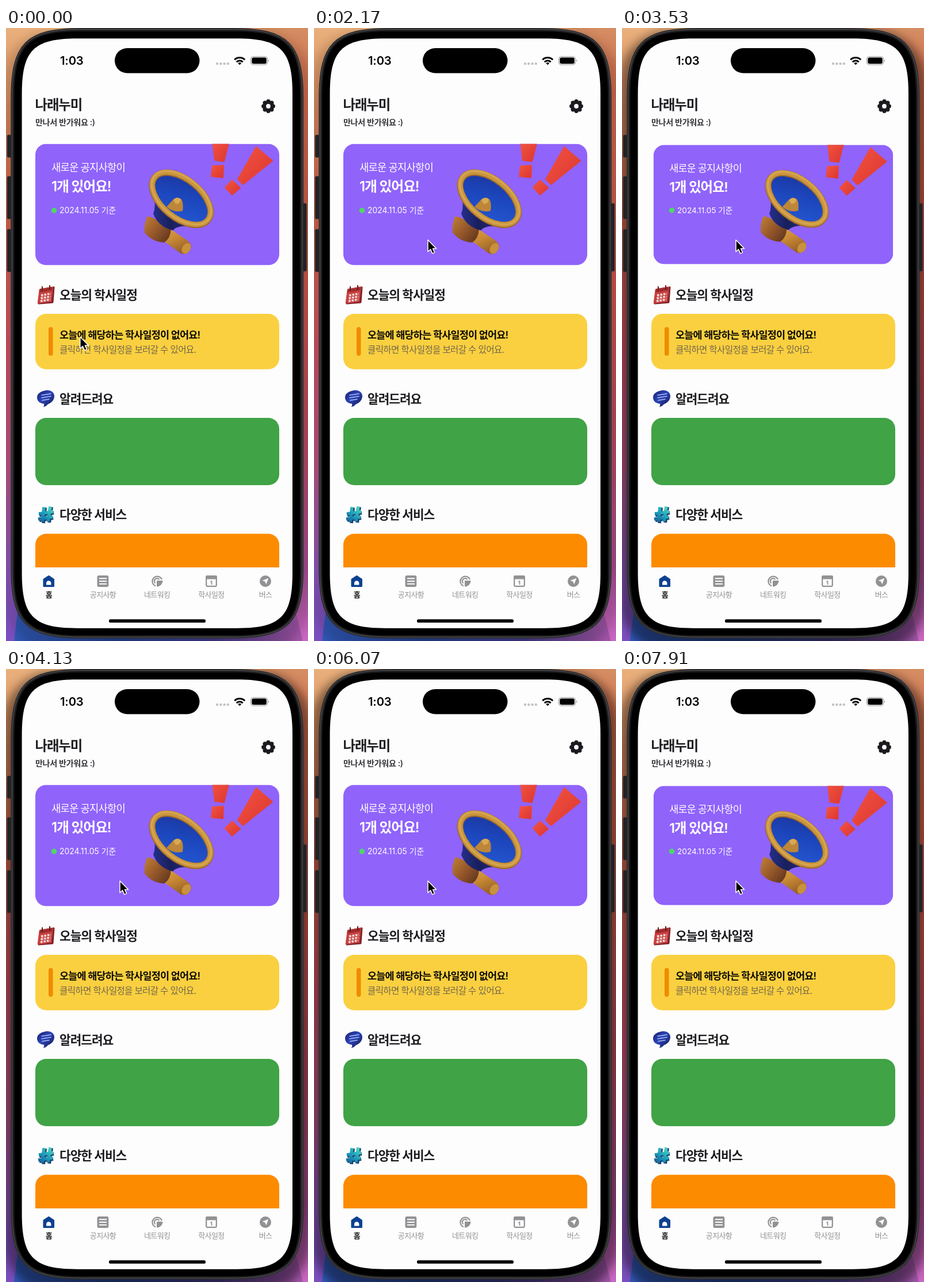
Animation of 525x1066 px, one loop 8000 ms. Source, as an HTML page:

```html
<!DOCTYPE html>
<html lang="ko">
<head>
<meta charset="utf-8">
<title>Card press</title>
<style>
html, body { margin: 0; width: 100%; height: 100%; overflow: hidden; background: #1c1c1e; }
svg { display: block; width: 525px; height: 1066px; }
text { font-family: Inter, "Noto Sans CJK KR", "Noto Sans CJK", sans-serif; white-space: pre; }
</style>
</head>
<body>
<svg viewBox="0 0 525 1066" xmlns="http://www.w3.org/2000/svg">
  <defs>
    <linearGradient id="leftWall" x2="0" y2="1">
      <stop offset="0" stop-color="#e9b07c"/><stop offset=".13" stop-color="#d8895c"/>
      <stop offset=".3" stop-color="#d5654c"/><stop offset=".52" stop-color="#cf5363"/>
      <stop offset=".72" stop-color="#ba5488"/><stop offset=".88" stop-color="#8e58bd"/>
      <stop offset="1" stop-color="#7a4fc0"/>
    </linearGradient>
    <linearGradient id="rightWall" x2="0" y2="1">
      <stop offset="0" stop-color="#d58e63"/><stop offset=".1" stop-color="#cf6a4c"/>
      <stop offset=".4" stop-color="#cc5647"/><stop offset=".65" stop-color="#b94a5c"/>
      <stop offset=".88" stop-color="#a94c92"/><stop offset="1" stop-color="#c968c4"/>
    </linearGradient>
    <linearGradient id="floor">
      <stop offset="0" stop-color="#3159b8"/><stop offset=".35" stop-color="#23408c"/>
      <stop offset=".7" stop-color="#433a86"/><stop offset="1" stop-color="#a556a8"/>
    </linearGradient>
    <linearGradient id="red" x2="1" y2="1">
      <stop offset="0" stop-color="#f2543f"/><stop offset="1" stop-color="#dc3632"/>
    </linearGradient>
    <linearGradient id="gold" x2=".5" y2="1">
      <stop offset="0" stop-color="#dda344"/><stop offset=".5" stop-color="#c88a35"/><stop offset="1" stop-color="#9a6128"/>
    </linearGradient>
    <linearGradient id="brown" x2="1" y2=".8">
      <stop offset="0" stop-color="#c28135"/><stop offset=".5" stop-color="#995a2b"/><stop offset="1" stop-color="#63371f"/>
    </linearGradient>
    <linearGradient id="bell" x2=".8" y2="1">
      <stop offset="0" stop-color="#1b3295"/><stop offset=".5" stop-color="#1c46bc"/><stop offset="1" stop-color="#2458d2"/>
    </linearGradient>
    <linearGradient id="cone">
      <stop offset="0" stop-color="#26328f"/><stop offset=".45" stop-color="#191f5c"/><stop offset="1" stop-color="#2a2d7d"/>
    </linearGradient>
    <linearGradient id="bubble" x2="1" y2="1">
      <stop offset="0" stop-color="#191c6a"/><stop offset=".45" stop-color="#2c46b8"/><stop offset="1" stop-color="#12124a"/>
    </linearGradient>
    <linearGradient id="teal" gradientUnits="userSpaceOnUse" x1="80" y1="834" x2="58" y2="860">
      <stop offset="0" stop-color="#4fd6c0"/><stop offset=".5" stop-color="#1b9dba"/><stop offset="1" stop-color="#1c5c9a"/>
    </linearGradient>
    <clipPath id="cardClip"><rect x="51" y="201.500" width="424" height="211" rx="19"/></clipPath>
    <clipPath id="listClip"><rect x="27" y="870" width="471" height="68"/></clipPath>
    <filter id="soft" x="-20%" y="-10%" width="140%" height="120%"><feGaussianBlur stdDeviation="8"/></filter>
  </defs>

  <!-- Wallpaper -->
  <rect width="263" height="1066" fill="url(#leftWall)"/>
  <rect x="262" width="263" height="1066" fill="url(#rightWall)"/>
  <path d="M22 1000L14 1066H516L500 1000Z" fill="url(#floor)"/>
  <rect id="shadow" x="-4" y="4" width="533" height="1080" rx="88" fill="#000" filter="url(#soft)"/>

  <!-- Phone -->
  <g fill="#222225" stroke="#3d3c3f" stroke-width=".7">
    <rect x="2" y="186" width="12" height="39" rx="2"/>
    <rect x="2" y="258" width="12" height="74" rx="2"/>
    <rect x="2" y="350" width="12" height="74" rx="2"/>
    <rect x="510" y="305" width="12.500" height="118" rx="2"/>
  </g>
  <g id="phone"></g>

  <!-- Status bar -->
  <rect x="189" y="35" width="147.500" height="43.500" rx="21.750"/>
  <g fill="#c3c3c5"><circle cx="367" cy="62" r="2.2"/><circle cx="373.300" cy="62" r="2.2"/><circle cx="379.600" cy="62" r="2.2"/><circle cx="385.800" cy="62" r="2.2"/></g>
  <g fill="none" stroke="#000" stroke-width="3">
    <path d="M397.300 55.300a12.500 12.500 0 0 1 17.800 0M400.800 59.100a7.600 7.600 0 0 1 10.800 0"/>
    <path d="M403.300 61.300a4.300 4.300 0 0 1 5.800 0L406.200 64.200Z" fill="#000" stroke="none"/>
  </g>
  <rect x="425.500" y="49.500" width="29" height="14.500" rx="4.800" fill="none" stroke="#9b9b9d" stroke-width="1.2"/>
  <rect x="427.300" y="51.200" width="25.500" height="11" rx="3.200"/>
  <path d="M456 54.500q2.600 2.200 0 4.600Z" fill="#a5a5a7"/>

  <g id="gear" fill="#1b1b1f" transform="translate(456 136)"></g>

  <!-- Notice card -->
  <g id="card">
    <g clip-path="url(#cardClip)">
      <rect x="51" y="201.500" width="424" height="211" fill="#9063fb"/>
      <g fill="url(#red)" stroke="url(#red)" stroke-width="2" stroke-linejoin="round">
        <path d="M359 196H388L379 232L363 230Z"/>
        <path d="M359 240L378 239L377 260L357 258Z"/>
        <path d="M435 207L463 231L412 272L403 263Z"/>
        <path d="M393 265L407 278L393 290L381 277Z"/>
      </g>
      <path d="M282 347L316 370Q325 377 320 386Q314 396 304 392L268 366Z" fill="url(#gold)"/>
      <ellipse cx="313.500" cy="383" rx="7" ry="10" transform="rotate(34 313 383)" fill="#c9913b"/>
      <path d="M246 327Q262 331 287 349Q286 366 275 373Q254 372 241 356Q239 341 246 327Z" fill="url(#brown)"/>
      <path d="M252 277Q263 306 256 323Q264 345 290 352Q298 342 328 345Z" fill="url(#cone)"/>
      <g transform="translate(304.800 297) rotate(39)">
        <ellipse rx="59" ry="34" fill="url(#bell)"/>
        <ellipse rx="59.300" ry="33.500" fill="none" stroke="#a06a2b" stroke-width="11"/>
        <ellipse cx="-.5" cy="-.8" rx="59.300" ry="33.500" fill="none" stroke="#ca963f" stroke-width="8.500"/>
        <ellipse cx="-1" cy="-1.500" rx="60" ry="34.500" fill="none" stroke="#e3b45c" stroke-width="2.500" opacity=".6"/>
      </g>
      <path d="M279 311L291 298Q298 292 305 298Q309 304 307 318Q292 322 279 311Z" fill="#bd8639"/>
      <path d="M291 299Q298 292 304 298Q303 306 295 306Z" fill="#d9a851"/>
    </g>
    <circle cx="83.500" cy="317.300" r="4.700" fill="#4cd964"/>
    <g id="cardText"></g>
  </g>

  <!-- Calendar icon -->
  <g stroke-linejoin="round">
    <path d="M60 455L83 451L81 477L57 479Z" fill="#7d2226" stroke="#7d2226" stroke-width="3"/>
    <path d="M59 455L81 451L78 475L56 478Z" fill="#c8403f" stroke="#c8403f" stroke-width="2.500"/>
    <path d="M58.500 455L81 451L80.500 456L58 460Z" fill="#9c2b2e"/>
    <path d="M61 465L78 462M60.500 470L77.500 467M60 475L77 472" fill="none" stroke="#f0d9d7" stroke-width="3.600" stroke-dasharray="3.700 1.800"/>
    <path d="M63 456V450M76 454V448" stroke="#5a2020" stroke-width="2" stroke-linecap="round"/>
  </g>

  <!-- Chat icon -->
  <path d="M68 630.500C78 628.500 84 634 84 640C84 648 77 653 73 654Q70 658 65 659Q67 656 66 653.500C58 653 54 648 54 642.500C54 636 60 632 68 630.500Z" fill="url(#bubble)"/>
  <path d="M62 638.500L78 636M62 643L78 640.500M63 647.500L75 645.500" stroke="#a9bdf5" stroke-width="1.700" stroke-linecap="round"/>

  <!-- Hash icon -->
  <g fill="none">
    <path d="M68 834L65 861M79 833L75 860M58 847L83 843M58 856L82 852" stroke="#17406f" stroke-width="6"/>
    <path d="M66 833L63 859M77 832L73 858M57 845L82 841M56 854L81 850" stroke="url(#teal)" stroke-width="5.500"/>
  </g>

  <rect x="51" y="497" width="424" height="96.500" rx="19" fill="#fad040"/>
  <rect x="74" y="520" width="7.500" height="50" rx="3.700" fill="#f08a00"/>
  <rect x="51" y="678" width="424" height="117" rx="19" fill="#40a346"/>
  <g clip-path="url(#listClip)"><rect x="51" y="879.500" width="424" height="117" rx="19" fill="#fd8b00"/></g>

  <!-- Tab bar -->
  <path d="M74.300 953.500L82.500 959V970.500H66V959Z" fill="#0d4190" stroke="#0d4190" stroke-width="3" stroke-linejoin="round"/>
  <path d="M70 965.500a4.200 4.200 0 0 1 8.400 0V968.500H70Z" fill="#fdfdfd"/>
  <g fill="#929295">
    <rect x="158.500" y="952" width="19.800" height="20" rx="3"/>
    <path d="M162 957.300H175M162 962H175M162 966.700H175" stroke="#fdfdfd" stroke-width="2"/>
    <g fill="none" stroke="#929295" stroke-width="2.200">
      <path d="M260 970.300A8.600 8.600 0 1 1 271 959"/>
      <path d="M259.500 965.500A4.800 4.800 0 1 1 266.500 959"/>
    </g>
    <path d="M262 961H272.500A10.500 10.500 0 0 1 262 971.500Z"/>
    <rect x="348.200" y="953.200" width="17.600" height="17.600" rx="2" fill="none" stroke="#929295" stroke-width="2.200"/>
    <rect x="347.500" y="952.500" width="19" height="6"/>
    <path d="M355.300 963L357.500 962V968" fill="none" stroke="#929295" stroke-width="1.700"/>
    <circle cx="451" cy="962" r="10"/>
    <path d="M456.300 956.700L452.300 967.300L450.300 962.700L445.700 960.700Z" fill="#fdfdfd"/>
  </g>
  <rect x="179" y="1028.300" width="168" height="5.700" rx="2.850"/>
  <g id="labels"></g>

  <path id="cursor" d="M0 0V20.500L4.600 16.400L7.700 23.600L11.600 21.900L8.600 15H14.600Z" stroke="#fff" stroke-width="1.500" stroke-linejoin="round"/>
</svg>
<script>
const LOOP = 8000;
const $ = id => document.getElementById(id);

function add(parent, tag, attrs, content = "") {
  const node = document.createElementNS("http://www.w3.org/2000/svg", tag);
  for (const [key, value] of Object.entries(attrs)) node.setAttribute(key, value);
  node.textContent = content;
  parent.appendChild(node);
}

// Rounded box whose corners ease gradually into the straight sides
function smoothBox(left, top, right, bottom, radius, attrs) {
  const far = radius * 1.42, near = radius * 0.3;
  const d = `M${left} ${top + far}C${left} ${top + near} ${left + near} ${top} ${left + far} ${top}
    H${right - far}C${right - near} ${top} ${right} ${top + near} ${right} ${top + far}
    V${bottom - far}C${right} ${bottom - near} ${right - near} ${bottom} ${right - far} ${bottom}
    H${left + far}C${left + near} ${bottom} ${left} ${bottom - near} ${left} ${bottom - far}Z`;
  add($("phone"), "path", { d, ...attrs });
}
smoothBox(9, 0.8, 516.5, 1060.8, 86, { fill: "#1c1c1e", stroke: "#2e2e30", "stroke-width": 1.5 });
smoothBox(10.8, 2.6, 514.8, 1059, 84, { fill: "none", stroke: "#5c5b5d" });
smoothBox(14.5, 6, 511, 1056, 80, { fill: "#000" });
smoothBox(27.6, 18.3, 498, 1043.7, 68, { fill: "#fdfdfd" });

// cy is the optical middle of the line
function label(parent, content, x, cy, size, { weight = 600, color = "#1c1c20", tracking = -0.048, anchor = "start" } = {}) {
  add(parent, "text", {
    x, y: cy + size * 0.37, "font-size": size, "text-anchor": anchor,
    style: `font-weight:${weight};fill:${color};letter-spacing:${tracking}em`
  }, content);
}

const cardText = $("cardText");
label(cardText, "새로운 공지사항이", 79, 242, 17.8, { color: "#fff", weight: 500 });
label(cardText, "1개 있어요!", 79, 275.5, 23.8, { color: "#fff" });
label(cardText, "2024.11.05 기준", 93, 317.3, 13.9, { color: "#fff", weight: 400, tracking: 0 });

const labels = $("labels");
label(labels, "1:03", 94, 56.8, 20.3, { color: "#000", tracking: -0.01 });
label(labels, "나래누미", 50.5, 133.5, 23.4, { weight: 700 });
label(labels, "만나서 반가워요 :)", 51, 164, 14.1, { color: "#35353a", tracking: -0.025 });
label(labels, "오늘의 학사일정", 93, 464, 21.4);
label(labels, "알려드려요", 93, 645, 21.4);
label(labels, "다양한 서비스", 93, 846.5, 21.4);
label(labels, "오늘에 해당하는 학사일정이 없어요!", 93, 533.5, 17.5, { color: "#0d0b04" });
label(labels, "클릭하면 학사일정을 보러갈 수 있어요.", 93, 559, 15.7, { color: "#75664a", weight: 400 });
["홈", "공지사항", "네트워킹", "학사일정", "버스"].forEach((name, i) =>
  label(labels, name, 74.3 + i * 94.2, 984.7, 13, { anchor: "middle", weight: i ? 500 : 600, color: i ? "#929295" : "#1c1c20" }));

for (let i = 0; i < 8; i++) {
  const angle = i * Math.PI / 4;
  add($("gear"), "circle", { cx: 8.2 * Math.cos(angle), cy: 8.2 * Math.sin(angle), r: 3.7 });
}
add($("gear"), "circle", { r: 8.5 });
add($("gear"), "circle", { r: 3.9, fill: "#fdfdfd" });

const clamp = v => Math.max(0, Math.min(1, v));
const easeOut = p => 1 - (1 - clamp(p)) ** 3;
const easeInOut = p => { p = clamp(p); return p * p * (3 - 2 * p); };

const RAMP = 200;
const presses = [{ down: 2380, up: 3472 }, { down: 6549, up: 7852 }];

function cardScale(t) {
  const depth = presses.reduce((sum, { down, up }) =>
    sum + easeOut((t - down) / RAMP) - easeOut((t - up) / RAMP), 0);
  return 1 - 0.05 * depth;
}

function render(t) {
  const s = cardScale(t);
  $("card").setAttribute("transform", `translate(263 307) scale(${s}) translate(-263 -307)`);
  const move = easeInOut((t - 250) / 900);
  $("cursor").setAttribute("transform", `translate(${128.8 + 69.2 * move} ${537 - 168.5 * move})`);
  // The window shadow deepens once the first click focuses it
  $("shadow").setAttribute("opacity", t < presses[0].down ? 0.14 : 0.42);
}

const start = performance.now();
function tick() {
  render((performance.now() - start) % LOOP);
  requestAnimationFrame(tick);
}
tick();
</script>
</body>
</html>
```
